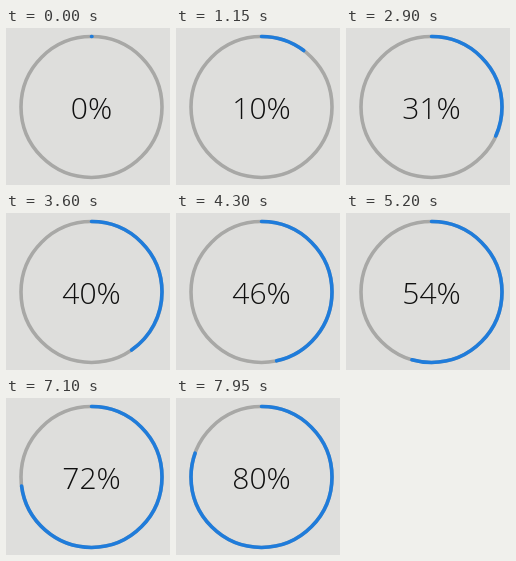
Write an HTML page that moves like this. It is 164x157 px and loops after 8000 ms.

```html
<!DOCTYPE html>
<html lang="en">
<head>
<meta charset="utf-8">
<title>Progress ring</title>
<style>
  html, body { margin: 0; width: 100%; height: 100%; overflow: hidden; background: #dededc; }
  svg { display: block; width: 164px; height: 157px; }
  circle { fill: none; stroke-width: 3.6; }
  #label { font: 300 30px "Open Sans", "Noto Sans", sans-serif; fill: #101010; text-anchor: middle; }
</style>
</head>
<body>
<svg viewBox="0 0 164 157">
  <circle cx="85.5" cy="79" r="70.5" stroke="#a8a8a6"/>
  <circle id="arc" cx="85.5" cy="79" r="70.5" stroke="#1f7cdb" stroke-linecap="round"
    transform="rotate(-90 85.5 79)"/>
  <text id="label" x="85.5" y="91">0%</text>
</svg>
<script>
  const LOOP = 8000;
  const LENGTH = 2 * Math.PI * 70.5;
  // Time in ms and percentage reached
  const keys = [[0, 0.1], [1150, 10.2], [2250, 23.7], [3600, 40.3], [5200, 54.4], [6200, 64.8], [8000, 80.8]];
  const arc = document.getElementById("arc");
  const label = document.getElementById("label");

  function progress(t) {
    const i = keys.findIndex(k => k[0] > t);
    const [t0, p0] = keys[i - 1];
    const [t1, p1] = keys[i];
    return p0 + (p1 - p0) * (t - t0) / (t1 - t0);
  }

  function draw(t) {
    const p = progress(t);
    arc.setAttribute("stroke-dasharray", `${LENGTH * p / 100} ${LENGTH}`);
    label.textContent = `${Math.floor(p)}%`;
  }

  const start = performance.now();
  function tick() {
    draw((performance.now() - start) % LOOP);
    requestAnimationFrame(tick);
  }
  draw(0);
  requestAnimationFrame(tick);
</script>
</body>
</html>
```
